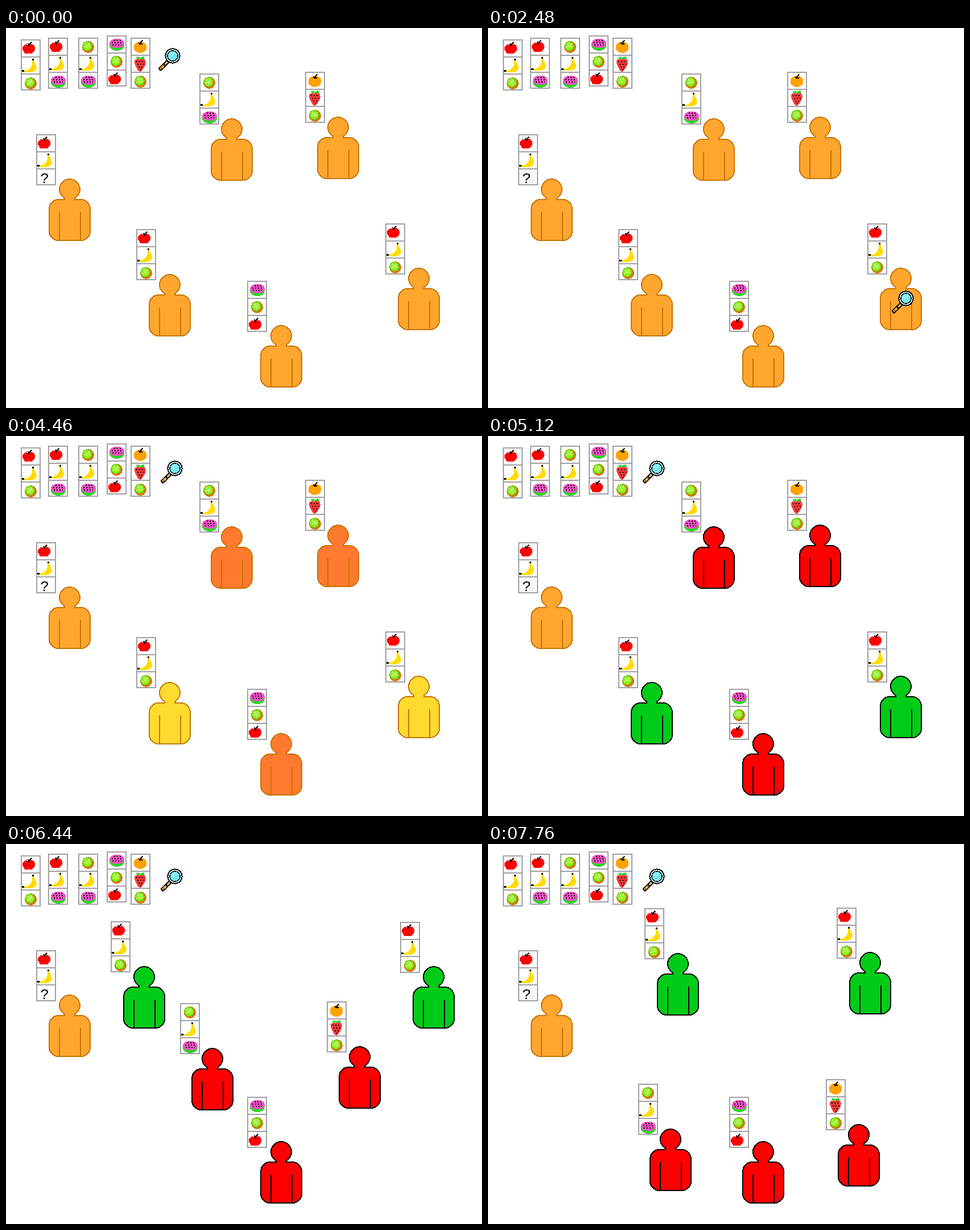
Write an HTML page that moves like this. It is 837 px wide and 669 px high and loops after 8000 ms.

```html
<!DOCTYPE html>
<html lang="en">
<head>
<meta charset="utf-8">
<title>Fruit matching</title>
<style>
html, body { margin: 0; width: 100%; height: 100%; overflow: hidden; background: #fff; }
svg { display: block; width: 837px; height: 669px; shape-rendering: crispEdges; }
.body { stroke-width: 2; }
.card { fill: #fff; stroke: #a0a0a0; stroke-width: 2; }
.ink { fill: none; stroke: #000; stroke-width: 2; }
.seeds { fill: none; stroke: #000; stroke-width: 2; stroke-dasharray: 2 3; }
text { font: 26px "Liberation Mono", "DejaVu Sans Mono", monospace; text-anchor: middle; }
</style>
</head>
<body>
<svg viewBox="0 0 837 669">
  <defs>
    <g id="apple">
      <path fill="#f00" d="M0-5C-3-8-7-8-9-5Q-13 0-9 5L-7 9H5L9 6Q13 0 9-6L5-8Z"/>
      <path class="ink" d="M0-4L1-7L5-11M-2-8L1-7"/>
    </g>
    <g id="banana">
      <path fill="#ffdc00" d="M5-10H8C8-5 13-2 13 4C12 10 7 12 0 12H-8L-12 9C-6 10-1 8 1 4C5 2 5-3 5-10Z"/>
      <path d="M5-12h3v3h-3zM-13 8h4v3h-4z"/>
    </g>
    <g id="kiwi">
      <circle cx=".5" cy=".5" r="10.5" fill="#d87a08"/>
      <circle cx="-1" cy="-1" r="8.2" fill="#8cf016" stroke="#62b80c"/>
      <circle cx="-1" cy="-1" r="4" fill="none" stroke="#e8ffd0" stroke-width="3" stroke-dasharray="1.5 3.5"/>
      <circle cx="-1" cy="-1" r="1.5" fill="#fff"/>
    </g>
    <g id="melon">
      <ellipse cy=".5" rx="13.5" ry="10.5" fill="#2ed42a"/>
      <ellipse cy="-2" rx="13" ry="8.5" fill="#f252c4"/>
      <path class="seeds" d="M-5-7H8M-9-3H11M-8 1H8"/>
    </g>
    <g id="orange">
      <ellipse cy="1" rx="11.5" ry="10" fill="#ffa200"/>
      <path class="ink" d="M-3-6L0-5L1-8L4-11M0-5H4"/>
    </g>
    <g id="berry">
      <path fill="#ff3a3a" d="M-8-8Q-12-4-8 4L-4 12L0 14L4 11L8 4Q12-4 7-9Z"/>
      <path fill="#35d62c" d="M-8-10L-5-13L0-11L5-13L8-10L4-8L0-9L-4-8Z"/>
      <path class="seeds" d="M-7-4H8M-5 1H8M-3 6H5M0 10H2"/>
    </g>
    <text id="ask" y="9">?</text>
  </defs>
  <g id="stage"></g>
  <g id="lens">
    <path d="M2.5 38.5L18 24" stroke="#000" stroke-width="7"/>
    <path d="M4 37L11 30.5" stroke="#f2aa26" stroke-width="4"/>
    <path d="M12.5 29L17 25" stroke="#e8c060" stroke-width="3"/>
    <path d="M5 34L8 37M9 30L12 33" stroke="#000"/>
    <circle cx="26" cy="14" r="12.6" fill="#d4f6fa" stroke="#000" stroke-width="2"/>
    <circle cx="26" cy="14" r="9.2" fill="#72e8ee" stroke="#000" stroke-width="1.5"/>
    <path d="M21 13L25 8M23 16L29 9" stroke="#c0f8fb" stroke-width="1.5"/>
  </g>
</svg>
<script>
const LOOP = 8000, FIRST = 500, STEP = 330;
const FADE = 13, WALK = 17, TURN = 19, END = 23;   // ticks at which each part begins
const ORANGE = '#ffa62f', BROWN = '#c87400';
const stage = document.getElementById('stage');
const lens = document.getElementById('lens');

const fruitX = { apple: 14, banana: 15, ask: 15, melon: 18 };

const card = fruits => '<path class="card" d="M1 1H34V89H1ZM1 31H34M1 61H34"/>' +
  fruits.split(' ').map((fruit, row) =>
    `<use href="#${fruit}" x="${fruitX[fruit] || 17}" y="${Math.round(15.5 + 30.5 * row)}"/>`
  ).join('');

const torso = 'M28 37V34.6A18 18 0 1 1 46 34.6V37H58Q64 37 69 43Q73 47 73 54V93' +
  'Q73 99 69 103Q64 109 57 109H17Q10 109 5 103Q1 99 1 93V54Q1 47 5 43Q10 37 16 37Z';
const figure = (x, y) => `<g class="body" transform="translate(${x} ${y})">
  <path d="${torso}"/><path d="M19 59V109M56 59V109"/></g>`;

function add(html) {
  const g = document.createElementNS('http://www.w3.org/2000/svg', 'g');
  g.innerHTML = html;
  stage.append(g);
  return g;
}

const move = (el, [x, y]) =>
  el.setAttribute('transform', `translate(${Math.round(x)} ${Math.round(y)})`);
const clamp = (v, lo, hi) => Math.max(lo, Math.min(hi, v));

// Catmull-Rom curve through key points; u counts points
function spline(points, u) {
  const i = Math.floor(u), f = u - i;
  const [a, b, c, d] = [-1, 0, 1, 2].map(k => points[clamp(i + k, 0, points.length - 1)]);
  return b.map((q, n) => q + f / 2 * (c[n] - a[n] +
    f * (2 * a[n] - 5 * q + 4 * c[n] - d[n] + f * (3 * (q - c[n]) + d[n] - a[n]))));
}

// Each group nears its final place at its own pace
const user = { fills: [ORANGE], pace: 0 };
const match = { fills: [ORANGE, '#ffdb2f', '#a0dc28', '#00cc18'], pace: 0.83 };
const other = { fills: [ORANGE, '#ff792f', '#ff4018', '#ff0000'], pace: 0.42 };

const MATCH = 'apple banana kiwi', TROPIC = 'kiwi banana melon';
const MIXED = 'melon kiwi apple', CITRUS = 'orange berry kiwi';

[[MATCH, 26, 20], ['apple banana melon', 74, 17], [TROPIC, 127, 17], [MIXED, 177, 13], [CITRUS, 219, 17]]
  .forEach(([fruits, ...place]) => move(add(card(fruits)), place));

const people = [
  [user, 'apple banana ask', [22, 78], [[53, 187]]],
  [match, MATCH, [22, 79], [[229, 354], [220, 320], [184, 136], [275, 113]]],
  [match, MATCH, [22, 78], [[667, 344], [680, 296], [693, 137], [613, 112]]],
  [other, TROPIC, [20, 79], [[340, 80], [340, 123], [306, 280], [264, 422]]],
  [other, CITRUS, [21, 79], [[526, 77], [526, 120], [564, 277], [594, 414]]],
  [other, MIXED, [23, 78], [[424, 445]]]
].map(([group, fruits, offset, path]) => {
  const el = add(card(fruits) + figure(...offset));
  return { group, path, el, body: el.querySelector('.body') };
});

function stage3(tick, pace) {
  if (tick < WALK) return 0;
  if (tick <= TURN) return 1 + (tick - WALK) / 2;
  return tick < END ? 2 + pace : 3;
}

// The lens stops at every person; longer legs bow outwards halfway
const stops = [[95, 317], [266, 477], [459, 556], [709, 462], [561, 185], [380, 197]];

function lensAt(tick) {
  if (tick < 1) return [267, 35];
  if (tick >= FADE) return [271, 43];
  const i = (tick - 1) >> 1, a = stops[i], b = stops[i + 1];
  if (tick % 2 || !b) return a;
  const dx = b[0] - a[0], dy = b[1] - a[1], len = Math.hypot(dx, dy);
  const bow = Math.max(0, len - 180) / 3 / len;
  return [a[0] + dx / 2 - dy * bow, a[1] + dy / 2 + dx * bow];
}

function draw(t) {
  const tick = Math.floor((t - FIRST) / STEP) + 1;
  move(lens, lensAt(tick));
  for (const { group, path, el, body } of people) {
    const shade = clamp(tick - FADE + 1, 0, group.fills.length - 1);
    move(el, path.length > 1 ? spline(path, stage3(tick, group.pace)) : path[0]);
    body.style.fill = group.fills[shade];
    body.style.stroke = shade > 1 ? '#000' : BROWN;
  }
}

const start = performance.now();
function frame(now) {
  draw(Math.max(0, now - start) % LOOP);
  requestAnimationFrame(frame);
}
draw(0);
requestAnimationFrame(frame);
</script>
</body>
</html>
```
